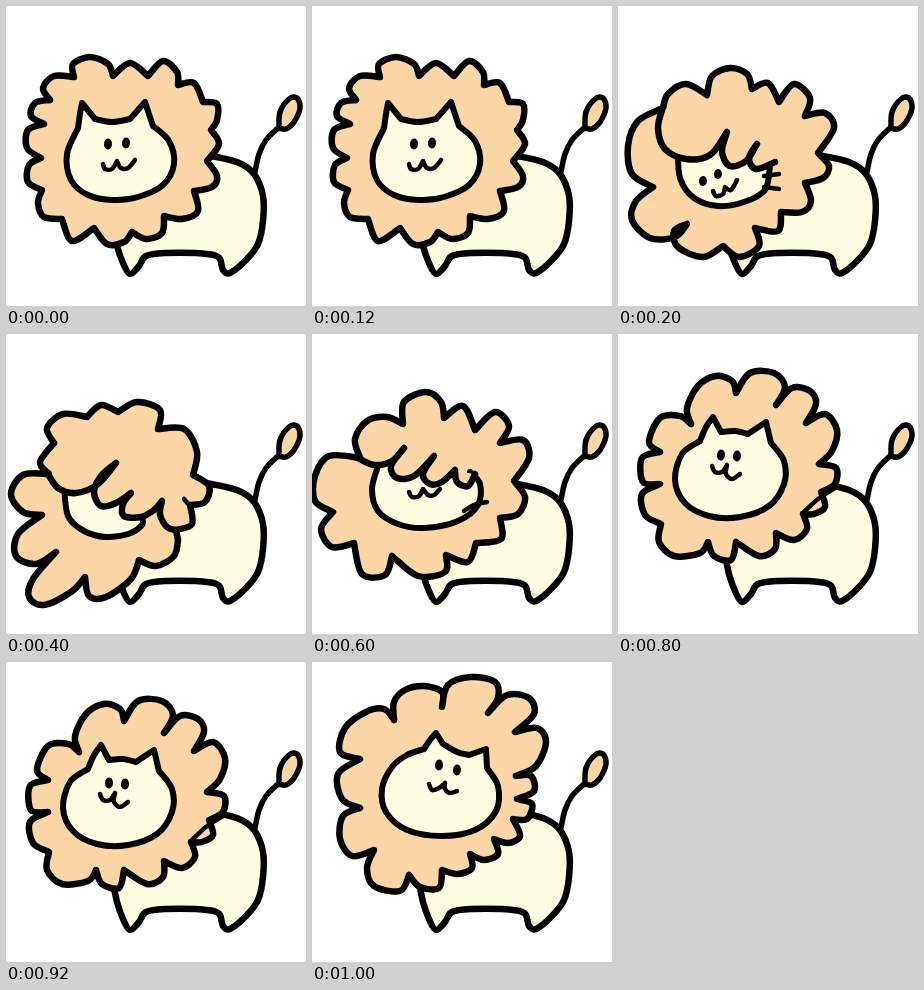
An HTML page with a canvas that plays this animation: 300x300 px, repeating every 1200 ms.

```html
<!DOCTYPE html>
<html lang="en">
<head>
<meta charset="utf-8">
<title>Lion shaking its mane</title>
<style>
html, body { margin: 0; width: 100%; height: 100%; overflow: hidden; background: #fff; }
canvas { display: block; width: 300px; height: 300px; }
</style>
</head>
<body>
<canvas id="stage" width="300" height="300"></canvas>
<script>
const ctx = document.getElementById('stage').getContext('2d');
const FUR = '#fcd6a6', CREAM = '#fffde2', INK = '#000';
const STEP = 200;

// Smooth runs of "x,y" points; "/" marks a sharp corner.
const body = '107,220 111,240 117,257 124,268 133,260 140,250 160,247 190,247 208,249/214,253 217,264 224,267 240,254 252,238 257,215 257,190 248,168 231,156 200,149';
const tail = '249,166 253,148 260,134 272,122';
const tailTip = '273,122 274,106 283,93 291,92 294,102 288,116 280,123 273,122';

const poses = [
  {
    mane: '68,71/67,58 84,51 102,58 107,70/124,57 142,70/157,55 171,66 172,79/188,77 197,96/211,98 211,114 205,124/213,138 201,155/211,170 206,181 188,185/192,205 176,213 158,210/156,227 140,233 126,226/118,236 101,238 88,222/66,235 56,213/38,211 32,197 36,184/22,176 23,159 35,152/21,142 22,124 38,118/25,110 29,97 44,94/37,82 48,70 68,71',
    face: '72,122 74,108 76,97/89,113/106,116 124,113/139,96/147,120/163,135 168,158 157,179 132,191 107,194 82,189 65,174 61,148 72,122',
    eyes: [[102, 138, 4, 5.5], [120, 137, 4, 5.5]],
    lines: ['97,158 99,163 106,163 111,155/115,162 122,162 129,154']
  },
  {
    mane: '45,102/50,88 68,78 89,89/94,70 112,62 129,68 134,83/150,77 161,96/176,78 192,92 187,110/207,107 216,122 200,147/211,160 205,172 187,177/193,195 184,206 163,206/160,225 137,222/141,240 121,251 105,240/85,251 60,241 56,225 69,218/57,231 32,232 14,214 18,195 35,181/14,168 10,140 20,115 45,102',
    face: '60,143 62,172 76,192 100,200 126,196 147,184 152,160',
    hair: '45,101 40,122 47,143 68,153 92,149 109,126/104,146 112,160 128,155 139,138/131,152 138,163 157,156',
    eyes: [[85, 175, 4, 5], [100, 168, 4, 5]],
    lines: ['95,185 98,190 105,188 107,181/113,184 119,174', '146,170 161,168', '146,181 161,183']
  },
  {
    mane: '48,109/41,94 57,80 81,83/95,71 112,78/131,68 154,76 152,95/178,95 191,118 187,141/203,152 199,168 184,171/186,190 170,196/172,206/168,222 150,232 133,226/125,245 100,263 83,262 79,243/65,258 38,271 23,263 27,245 50,218/30,230 10,222 12,200 36,181/17,178 5,160 17,141 43,140/34,128 48,109',
    face: '58,151 62,182 78,197 100,203 122,200 136,191 136,183',
    hair: '42,140 52,154 70,159 92,150 110,129/95,142 88,158 95,172 110,169 125,159/117,170 118,182 135,183 148,176 156,167/154,180 161,193 170,196',
    eyes: [],
    lines: ['133,193 130,208 133,226'.slice(0, 14), '178,165 184,172']
  },
  {
    mane: '48,124/43,105 55,87 75,83 91,90/92,68 114,58 129,68 132,84/151,72 163,96/183,78 197,92 188,109/211,106 217,124 202,147/213,163 206,180 188,184/189,205 164,209/156,228 134,221/133,238 106,242 80,222/73,241 50,240 42,209/20,213 9,195 21,178/3,167 3,142 17,122 48,124',
    face: '66,132 60,155 66,177 86,190 112,194 146,187 166,171 168,150 158,138',
    hair: '46,124 62,131 80,127 92,114/79,132 85,144 102,142 122,122/111,140 118,150 130,148 143,136/145,148 156,152 163,140',
    eyes: [],
    lines: ['97,158 100,163 107,162 111,155/116,161 122,161 128,155', '152,177 162,171 175,168']
  },
  {
    mane: '73,90/69,74 80,52 98,42 114,47 118,59/132,39 156,39 167,53 158,71/174,54 192,57 198,70 188,89/207,80 219,96 214,117 201,130/218,134 217,150 203,158/207,173 196,180 185,180/189,195 176,206 158,199/157,215 141,222 118,208/113,226 96,222 90,208/82,219 56,222 41,208 43,190/27,181 24,160 42,150/25,148 24,124 42,118/31,108 42,84 62,82 73,90',
    face: '82,107 88,93 95,83/103,98/117,97 130,100/148,88/153,109/166,127 166,150 151,172 122,183 91,182 67,169 57,146 64,120 82,107',
    eyes: [[103, 121, 4, 5.5], [119, 122, 4, 5.5]],
    lines: ['94,132 97,138 104,138 109,131/108,140 114,145 122,140', '186,178 200,165 217,154']
  },
  {
    mane: '82,58/82,40 93,28 112,24 130,30 130,45/136,23 159,15 183,20 186,36 176,51/195,33 217,36 222,52 203,70/225,66 234,80 224,104 204,114/219,114 222,129 205,137/220,142 215,157 201,157/208,174 196,181 182,177/186,192 172,198 158,192/160,206 146,212 130,208/127,226 108,225 97,213/88,229 62,224 55,206 62,188/40,194 28,177 31,154 48,146/30,137 26,112 48,97/28,90 33,66 54,50 72,47 82,58',
    face: '112,87 118,78 124,71/131,82/145,90 157,93/174,87/175,106/186,124 184,149 163,168 130,174 95,168 74,150 70,127 80,105 95,93 112,87',
    eyes: [[127, 103, 4, 5.5], [145, 108, 4, 5.5]],
    lines: ['117,122 120,128 127,126 133,121/133,127 138,131 145,129']
  }
];
poses[2].lines.shift();

const parse = s => s.split('/').map(run => run.trim().split(' ').map(p => p.split(',').map(Number)));

function trace(s) {
  const path = new Path2D();
  let last = null;
  for (const run of parse(s)) {
    const p = last ? [last, ...run] : run;
    if (!last) path.moveTo(...p[0]);
    for (let i = 0; i < p.length - 1; i++) {
      const a = p[i - 1] || p[i], b = p[i], c = p[i + 1], d = p[i + 2] || c;
      path.bezierCurveTo(
        b[0] + (c[0] - a[0]) / 6, b[1] + (c[1] - a[1]) / 6,
        c[0] - (d[0] - b[0]) / 6, c[1] - (d[1] - b[1]) / 6,
        c[0], c[1]);
    }
    last = p[p.length - 1];
  }
  return path;
}

function shape(s, fill, width = 6.5) {
  const path = trace(s);
  if (fill) {
    ctx.fillStyle = fill;
    ctx.fill(path);
  }
  ctx.lineWidth = width;
  ctx.stroke(path);
}

function drawBody() {
  const inner = trace(body);
  inner.lineTo(150, 160);
  ctx.fillStyle = CREAM;
  ctx.fill(inner);
  shape(body);
  shape(tail, null, 5.5);
  shape(tailTip, FUR, 5.5);
}

function drawPose(pose) {
  ctx.fillStyle = '#fff';
  ctx.fillRect(0, 0, 300, 300);
  ctx.strokeStyle = INK;
  ctx.lineCap = ctx.lineJoin = 'round';
  drawBody();
  shape(pose.mane, FUR);
  shape(pose.face, CREAM, 6);
  if (pose.hair) shape(pose.hair, FUR);
  ctx.fillStyle = INK;
  for (const [x, y, rx, ry] of pose.eyes) {
    ctx.beginPath();
    ctx.ellipse(x, y, rx, ry, 0.1, 0, Math.PI * 2);
    ctx.fill();
  }
  for (const line of pose.lines) shape(line, null, 4.5);
}

const start = performance.now();
function tick() {
  const t = Math.max(0, performance.now() - start);
  drawPose(poses[Math.floor(t / STEP) % poses.length]);
  requestAnimationFrame(tick);
}
tick();
</script>
</body>
</html>
```
